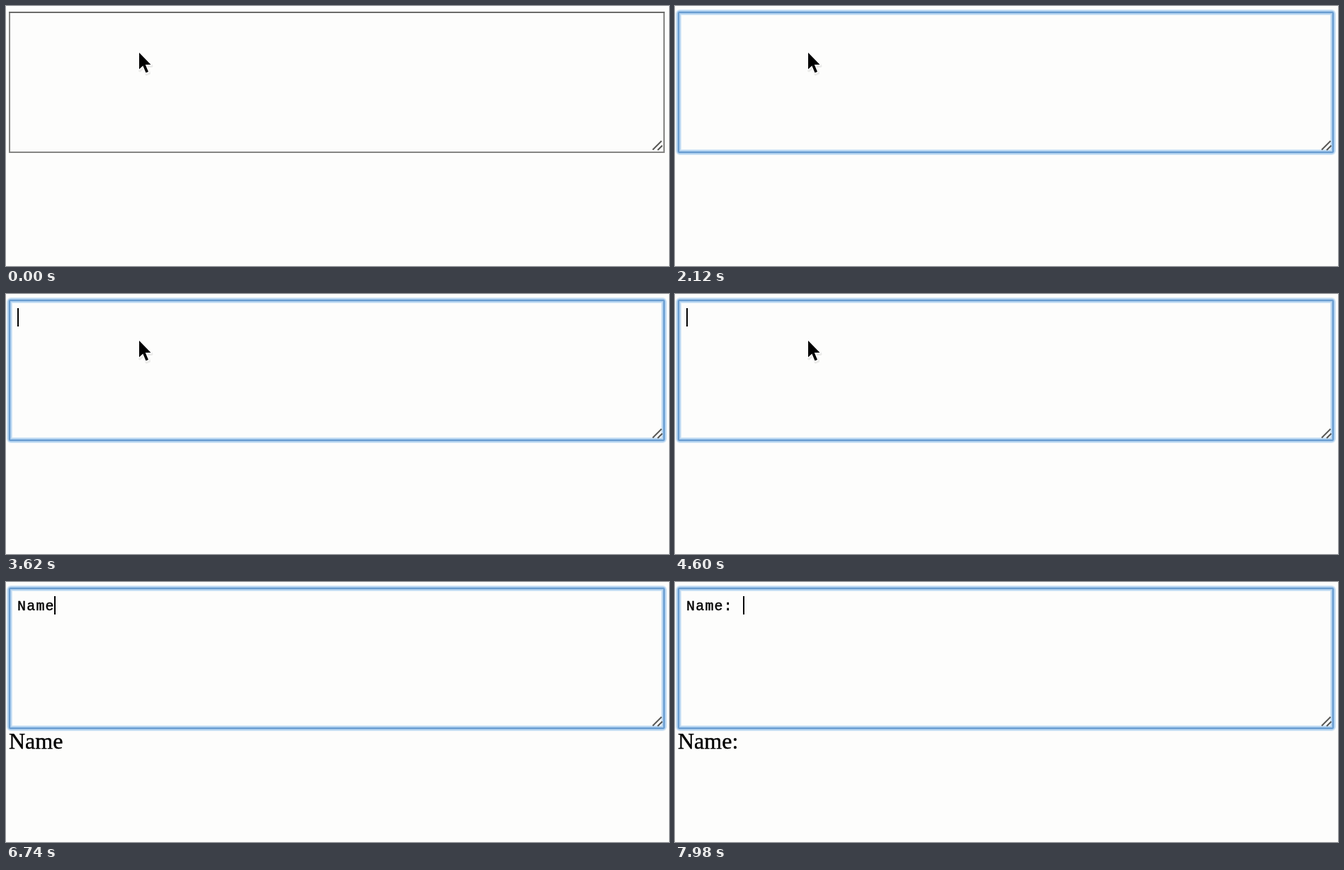
An HTML page that plays this animation: 936x368 px, repeating every 8000 ms.

```html
<!DOCTYPE html>
<html lang="en">
<head>
<meta charset="utf-8">
<title>Typing in a text area</title>
<style>
  html, body { margin: 0; width: 100%; height: 100%; overflow: hidden; background: #fdfdfc; }
  svg { display: block; width: 936px; height: 368px; }
  text { white-space: pre; stroke: #000; stroke-width: .4px; }
  #typed { font: 20px "Liberation Mono", "Courier New", monospace; letter-spacing: 1.2px; }
  #echo { font: 32px "Liberation Serif", "Times New Roman", serif; }
</style>
</head>
<body>
<svg viewBox="0 0 936 368">
  <g fill="none" stroke-width="2">
    <rect x="5" y="9" width="924" height="198" stroke="#858583"/>
    <path d="M4 9H930" stroke="#6c6c6a"/>
    <g id="ring">
      <rect x="5" y="9" width="924" height="198" rx="2" stroke="#d4e7f7"/>
      <rect x="5" y="9" width="924" height="198" rx="2" stroke="#a6caec"/>
      <rect x="5" y="9" width="924" height="198" rx="1" stroke="#689cd0"/>
    </g>
    <path d="M913 203.500L925.500 191M920 204L926.500 197.500" stroke="#565654"/>
  </g>
  <text id="typed" x="16" y="40"></text>
  <text id="echo" x="4" y="236"></text>
  <rect id="caret" y="20" width="2" height="26"/>
  <g id="pointer" stroke-linejoin="round">
    <path d="M188 66V89.500L193.300 84.500L197.500 94.500L201 93L196.800 83H204.500Z"
      transform="translate(1 2)" fill="#dededc" stroke="#dededc" stroke-width="4" opacity=".6"/>
    <path d="M188 66V89.500L193.300 84.500L197.500 94.500L201 93L196.800 83H204.500Z"
      stroke="#fff" stroke-width="3" paint-order="stroke"/>
  </g>
</svg>
<script>
const LOOP = 8000, FOCUS = 440, CARET = 500, BLINK = 500, CHAR = 13.2;
const message = "Name: ";
const keyTimes = [5220, 5520, 5840, 6140, 7320, 7600];
const ringWidths = [8, 5, 2];
const $ = id => document.getElementById(id);
const [ring, typed, echo, caret, pointer] = ["ring", "typed", "echo", "caret", "pointer"].map($);
const show = (el, on) => el.setAttribute("visibility", on ? "visible" : "hidden");

function draw(t) {
  const count = keyTimes.filter(k => k <= t).length;
  typed.textContent = echo.textContent = message.slice(0, count);
  show(pointer, !count);

  // The focus ring fades in while it tightens around the box.
  const p = Math.min(1, Math.max(0, (t - FOCUS) / 260));
  const ease = 1 - (1 - p) ** 2;
  ring.setAttribute("opacity", ease);
  ringWidths.forEach((w, i) =>
    ring.children[i].setAttribute("stroke-width", w + (1 - ease) * w));

  // Typing holds the caret on; otherwise it blinks.
  const typing = count && t - keyTimes[count - 1] < BLINK;
  show(caret, t >= CARET && (typing || Math.floor((t - CARET) / BLINK) % 2 === 0));
  caret.setAttribute("x", 2 * Math.round((16 + count * CHAR) / 2));
}

const start = performance.now();
function tick() {
  draw((performance.now() - start) % LOOP);
  requestAnimationFrame(tick);
}
tick();
</script>
</body>
</html>
```
